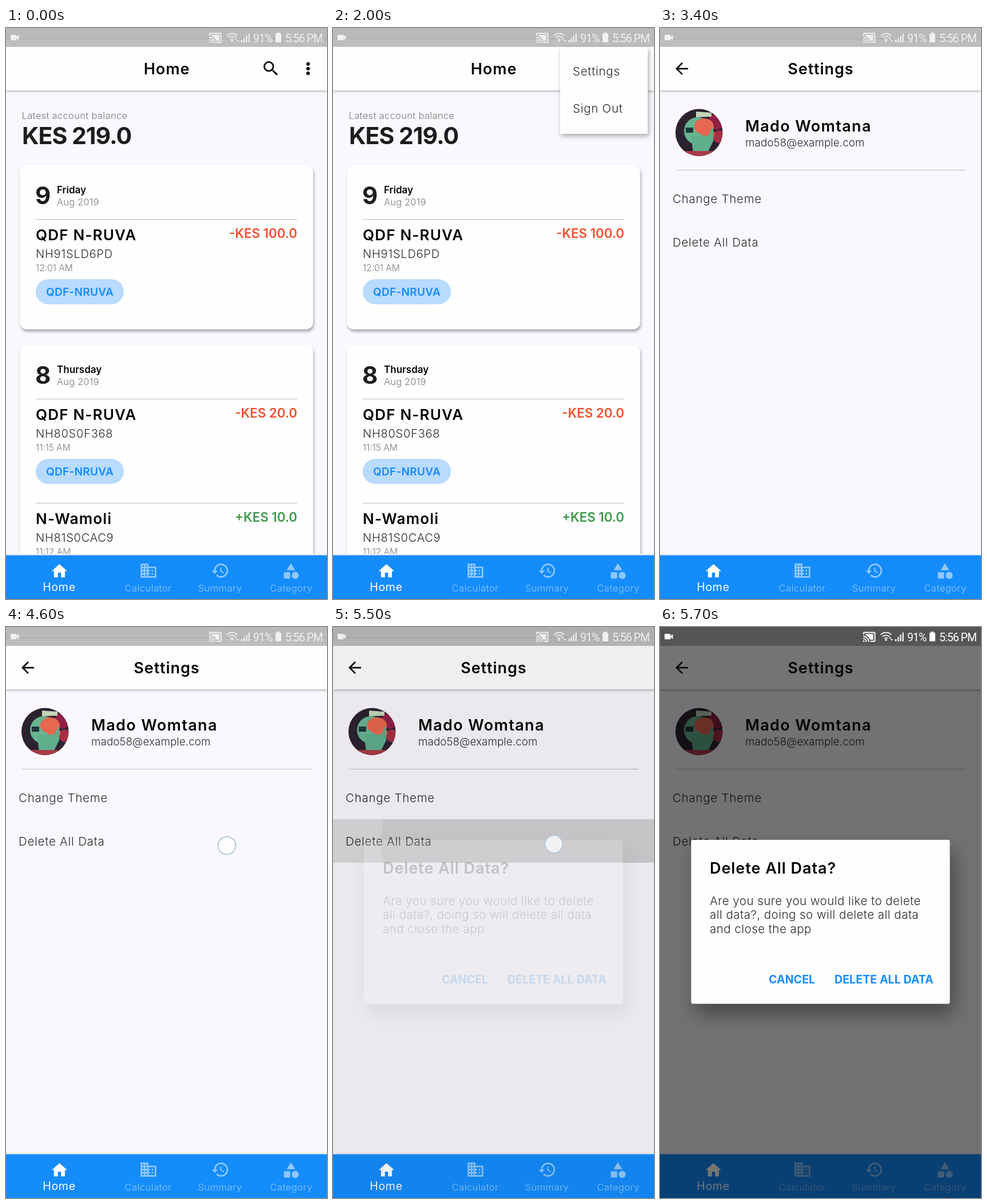
Recreate the animation shown at these times as an HTML page. Size 561 by 998 pixels, loop 8 s.

```html
<!DOCTYPE html>
<html lang="en">
<head>
<meta charset="utf-8">
<title>Money tracker</title>
<style>
  html, body { margin: 0; width: 100%; height: 100%; overflow: hidden; background: #faf8fc; }
  svg { display: block; width: 100vw; height: 100vh; }
  text { font-family: Inter, "Open Sans", sans-serif; font-weight: 350; fill: #2b2a2d; white-space: pre; }
  .title { font-size: 27px; font-weight: 600; letter-spacing: .035em; fill: #060607; }
  .caption { font-size: 16.5px; letter-spacing: .02em; fill: #79787b; }
  .balance { font-size: 41px; font-weight: 700; letter-spacing: -.024em; fill: #1d1c1f; }
  .day { font-size: 42px; font-weight: 700; fill: #1d1c1f; }
  .weekday { font-size: 17px; font-weight: 600; fill: #060607; }
  .date { font-size: 16.5px; letter-spacing: .01em; fill: #79787b; }
  .time { font-size: 15.6px; fill: #79787b; }
  .payee { font-size: 26px; font-weight: 600; letter-spacing: .045em; fill: #060607; }
  .code { font-size: 20px; letter-spacing: .038em; }
  .amount { font-size: 22.3px; font-weight: 600; text-anchor: end; }
  .chip { font-size: 19px; font-weight: 600; letter-spacing: .015em; fill: #148cfc; text-anchor: middle; }
  .tab { font-size: 16.5px; letter-spacing: .028em; fill: #fff; text-anchor: middle; }
  .tab.on { font-size: 19.5px; font-weight: 400; letter-spacing: .035em; }
  .person { font-size: 27px; font-weight: 600; letter-spacing: .05em; fill: #060607; }
  .mail { font-size: 18.8px; letter-spacing: .005em; }
  .item { font-size: 20.5px; letter-spacing: .036em; }
  .body { font-size: 20.5px; letter-spacing: .023em; }
  .button { font-size: 19.5px; font-weight: 700; letter-spacing: .005em; fill: #148cfc; }
  .status { font: 19.5px Roboto, sans-serif; letter-spacing: -.05em; fill: #fff; }
  .mid { text-anchor: middle; }
</style>
</head>
<body>
<svg id="stage" viewBox="0 0 561 998" preserveAspectRatio="none"></svg>
<script>
const LOOP = 8000, STEP = 100;
const stage = document.getElementById('stage');

const text = (x, y, cls, str, extra = '') => `<text x="${x}" y="${y}" class="${cls}" ${extra}>${str}</text>`;
const rect = (x, y, w, h, fill, extra = '') => `<rect x="${x}" y="${y}" width="${w}" height="${h}" fill="${fill}" ${extra}/>`;
const icon = (x, y, scale, d, fill = '#0b0b0c') =>
  `<path transform="translate(${x} ${y}) scale(${scale})" d="${d}" fill="${fill}" fill-rule="evenodd"/>`;
const shadow = (id, dx, dy, blur, alpha) =>
  `<filter id="${id}" x="-20%" y="-30%" width="140%" height="170%"><feDropShadow dx="${dx}" dy="${dy}" stdDeviation="${blur}" flood-opacity="${alpha}"/></filter>`;
const divider = (x1, x2, y) => rect(x1, y, x2 - x1, 1, '#bcbbbd');

const ICONS = {
  search: 'M15.5 14h-.79l-.28-.27A6.47 6.47 0 0 0 16 9.5 6.5 6.5 0 1 0 9.5 16c1.61 0 3.09-.59 4.23-1.57l.27.28v.79l5 4.99L20.49 19zm-6 0a4.5 4.5 0 1 1 0-9 4.5 4.5 0 0 1 0 9z',
  back: 'M20 11H7.83l5.59-5.59L12 4l-8 8 8 8 1.41-1.41L7.83 13H20z',
  home: 'M10 20v-6h4v6h5v-8h3L12 3 2 12h3v8z',
  building: 'M12 7V3H2v18h20V7zM6 19H4v-2h2zm0-4H4v-2h2zm0-4H4V9h2zm0-4H4V5h2zm4 12H8v-2h2zm0-4H8v-2h2zm0-4H8V9h2zm0-4H8V5h2zm10 12h-8v-2h2v-2h-2v-2h2v-2h-2V9h8zm-2-8h-2v2h2zm0 4h-2v2h2z',
  history: 'M13 3a9 9 0 0 0-9 9H1l4 4 4-4H6a7 7 0 1 1 2.06 4.94l-1.42 1.42A9 9 0 1 0 13 3zm-1 5v5l4.28 2.54.72-1.21-3.5-2.08V8z',
  shapes: 'M12 2l-5.5 9h11zM3 13.5h8v8H3zM22 17.5a4.5 4.5 0 1 1-9 0 4.5 4.5 0 0 1 9 0z',
  cast: 'M1 18v3h3c0-1.66-1.34-3-3-3zm0-4v2a5 5 0 0 1 5 5h2a7 7 0 0 0-7-7zm0-4v2a9 9 0 0 1 9 9h2A11 11 0 0 0 1 10zM21 3H3a2 2 0 0 0-2 2v3h2V5h18v14h-7v2h7a2 2 0 0 0 2-2V5a2 2 0 0 0-2-2zM5 7v1.6c4 1.3 7 4.3 8.4 8.4H19V7z'
};

const appBar = title =>
  rect(0, 20, 561, 89, '#fefdff', 'filter="url(#barShadow)"') + text(281, 80.5, 'title mid', title);

const card = (y, h, day, weekday) =>
  rect(24.5, y, 512, h, '#fffeff', 'rx="12" filter="url(#cardShadow)"') +
  text(51, y + 67.5, 'day', day) + text(89, y + 49, 'weekday', weekday) +
  text(89, y + 69.5, 'date', 'Aug 2019');

const entry = (y, payee, code, time, amount, chip) =>
  divider(52, 509, y) + text(52, y + 37, 'payee', payee) + text(52, y + 67.5, 'code', code) +
  text(52, y + 91, 'time', time) +
  text(509, y + 33, 'amount', amount, `style="fill:${amount[0] === '+' ? '#3d9a4a' : '#f4502f'}"`) +
  (chip ? rect(52, y + 105, 154, 44, '#b8dbff', 'rx="22"') + text(129, y + 134, 'chip', chip) : '');

const tab = (x, label, d, ix, iy, on) =>
  `<g opacity="${on ? 1 : .52}">${icon(ix, iy, 1.37, d, '#fff')}${text(x, on ? 983.5 : 984.5, on ? 'tab on' : 'tab', label)}</g>`;

const homePage = rect(0, 0, 561, 998, '#faf8fc') +
  text(27.5, 158.5, 'caption', 'Latest account balance') + text(28, 203, 'balance', 'KES 219.0') +
  card(240, 286.5, '9', 'Friday') +
  entry(334, 'QDF N-RUVA', 'NH91SLD6PD', '12:01 AM', '-KES 100.0', 'QDF-NRUVA') +
  card(554, 420, '8', 'Thursday') +
  entry(648, 'QDF N-RUVA', 'NH80S0F368', '11:15 AM', '-KES 20.0', 'QDF-NRUVA') +
  entry(830, 'N-Wamoli', 'NH81S0CAC9', '11:12 AM', '+KES 10.0') +
  appBar('Home') + icon(445.7, 53.7, 1.43, ICONS.search) +
  [62.8, 71, 79.2].map(y => `<circle cx="528" cy="${y}" r="3.1" fill="#0b0b0c"/>`).join('');

const avatar = `<g clip-path="url(#avatarClip)">
  ${rect(27, 141, 83, 84, '#2b2230')}
  <circle cx="98" cy="164" r="14" fill="#8f1f45"/><circle cx="103" cy="190" r="11" fill="#a52f44"/>
  <circle cx="66" cy="180" r="24" fill="#67b592"/>
  <ellipse cx="77" cy="172" rx="17" ry="14" fill="#e8674f"/>
  <circle cx="84" cy="185" r="11" fill="#e8674f"/>
  <path d="M63 146l27 2v7l-27 1z" fill="#c3d6b8"/>
  <path d="M54 188h30l9-16v26l-10 20H58z" fill="#5fae8c"/>
  ${rect(45, 174, 13, 9, '#22343a')}${rect(27, 215, 83, 10, '#a93a45')}
</g>`;

const settingsPage = rect(0, 0, 561, 998, '#faf8fc') + appBar('Settings') +
  icon(21.5, 54.5, 1.38, ICONS.back) + avatar +
  text(149, 181, 'person', 'Mado Womtana') + text(149, 207, 'mail', 'mado58@example.com') +
  divider(27, 534, 248) +
  `<g id="pressed" clip-path="url(#rowClip)">${rect(0, 336, 561, 76, '#000', 'opacity=".12"')}
    <circle id="ripple" cx="386" cy="379" opacity=".05"/></g>` +
  text(22, 306, 'item', 'Change Theme') + text(22, 382, 'item', 'Delete All Data');

const navBar = rect(0, 919, 561, 2, '#f0eef2') + rect(0, 921.5, 561, 77, '#148cfc') +
  tab(93, 'Home', ICONS.home, 77, 932.8, true) +
  tab(248.5, 'Calculator', ICONS.building, 232.5, 932) +
  tab(374, 'Summary', ICONS.history, 358, 932) +
  tab(498.5, 'Category', ICONS.shapes, 481.5, 932.8);

const menu = `<g id="menu"><rect id="menuBox" y="33" rx="3" fill="#fffeff" filter="url(#menuShadow)"/>
  ${rect(397, 43, 153, 65.5, '#f4f2f5', 'id="hover"')}
  ${text(419, 83, 'item', 'Settings', 'id="item0"')}${text(419, 148, 'item', 'Sign Out', 'id="item1"')}</g>`;

const dialog = `<g id="dialog">${rect(54.5, 372, 452, 286.5, '#fffeff', 'rx="3" filter="url(#dialogShadow)"')}
  ${text(87, 431, 'title', 'Delete All Data?')}
  ${['Are you sure you would like to delete', 'all data?, doing so will delete all data', 'and close the app']
    .map((line, i) => text(87, 485.5 + i * 24.5, 'body', line)).join('')}
  ${text(190, 623, 'button', 'CANCEL')}${text(305, 623, 'button', 'DELETE ALL DATA')}</g>`;

const wifiArc = r => `<path d="M${395 - r * .72} ${23 - r * .72}a${r} ${r} 0 0 1 ${r * 1.44} 0" fill="none" stroke="#fff" stroke-width="1.8"/>`;
const statusIcons = `<g id="status">
  ${rect(8, 12, 10.5, 9.5, '#fff', 'rx="1"')}<path d="M18 16l4.5-3.5v8.5L18 17.5z" fill="#fff"/>
  ${icon(354, 5.5, .98, ICONS.cast, '#fff')}
  ${[4, 8.5, 13].map(wifiArc).join('')}<circle cx="395" cy="22.5" r="1.8" fill="#fff"/>
  <path d="M400 20l2-3 2 3zm3 1h4l-2 3z" fill="#fff"/>
  ${[0, 1, 2, 3].map(i => rect(411 + i * 4.2, 21 - i * 3.8, 2.2, 4 + i * 3.8, '#fff')).join('')}
  ${text(432, 24.5, 'status', '91%')}
  <path d="M473.5 8h5v2h2.5v15h-10V10h2.5z" fill="#fff"/>
  ${text(488, 24.5, 'status', '5:56 PM')}</g>`;

stage.innerHTML = `<defs>
  ${shadow('barShadow', 0, 1.5, 2, .32)}${shadow('cardShadow', 1.5, 4, 2.8, .34)}
  ${shadow('menuShadow', 2, 4, 4, .32)}${shadow('dialogShadow', 7, 18, 17, .38)}
  <clipPath id="pageClip">${rect(0, 0, 561, 921, '#000')}</clipPath>
  <clipPath id="rowClip">${rect(0, 336, 561, 76, '#000')}</clipPath>
  <clipPath id="avatarClip"><circle cx="68.2" cy="182.8" r="41.2"/></clipPath>
  </defs>
  <g clip-path="url(#pageClip)"><g>${homePage}</g><g id="settings">${settingsPage}</g>${menu}</g>
  ${navBar}${rect(0, 0, 561, 33, '#000', 'opacity=".255"')}
  ${rect(0, 0, 561, 998, '#000', 'id="scrim"')}${dialog}${statusIcons}
  <circle id="touch" r="15.5" fill="#fdfdff" fill-opacity=".75" stroke="#b4c8dc" stroke-width="2"/>`;

const part = {};
stage.querySelectorAll('[id]').forEach(el => part[el.id] = el);
const set = (id, attrs) => { for (const k in attrs) part[id].setAttribute(k, attrs[k]); };

const clamp = v => Math.min(1, Math.max(0, v));
const span = (t, from, to) => clamp((t - from) / (to - from));

// CSS-style cubic easing, solved by bisection
const bezier = (x1, y1, x2, y2) => x => {
  const at = (a, b, s) => 3 * a * s * (1 - s) ** 2 + 3 * b * s * s * (1 - s) + s ** 3;
  let lo = 0, hi = 1;
  for (let i = 0; i < 24; i++) {
    const mid = (lo + hi) / 2;
    if (at(x1, x2, mid) < x) lo = mid; else hi = mid;
  }
  return at(y1, y2, hi);
};
const fastOutSlowIn = bezier(.4, 0, .2, 1), easeIn = bezier(.42, 0, 1, 1);
const easeOut = bezier(0, 0, .58, 1), ease = bezier(.25, .1, .25, 1);

const taps = [
  { from: 1500, to: 1700, x: 538, y: 67 },
  { from: 3000, to: 3150, x: 489, y: 80 },
  { from: 4600, to: 5100, x: 386, y: 382 },
  { from: 5300, to: 5550, x: 386, y: 379.5 }
];

function drawMenu(t) {
  const p = t < 3000 ? span(t, 1650, 1950) : clamp((1 - span(t, 3050, 3350)) * 1.5);
  const unit = 1 / 3.5;
  const w = 153 * clamp(p / unit), h = 152 * clamp(p / (2 * unit));
  set('menu', { opacity: clamp(p * 3) });
  set('menuBox', { x: 550 - w, width: w, height: h });
  [0, 1].forEach(i => set('item' + i, { opacity: span(p, unit * (i + 1), unit * (i + 2.5)) }));
  set('hover', { opacity: t >= 3000 ? clamp(p * 2 - 1) : 0 });
}

function draw(t) {
  drawMenu(t);

  const page = span(t, 3070, 3370);
  set('settings', { opacity: easeIn(page), transform: `translate(0 ${222 * (1 - fastOutSlowIn(page))})` });

  set('pressed', { opacity: span(t, 5250, 5450) * (1 - span(t, 5520, 5680)) });
  set('ripple', { r: 301 * span(t, 5270, 5500) });

  const pop = span(t, 5484, 5634);
  set('scrim', { opacity: .54 * ease(pop) });
  set('dialog', { opacity: easeOut(pop) });
  set('status', { opacity: .8 + .2 * pop });

  const tap = taps.find(k => t >= k.from && t < k.to);
  set('touch', tap ? { cx: tap.x, cy: tap.y, opacity: 1 } : { opacity: 0 });
}

const start = performance.now();
function tick() {
  const t = (performance.now() - start) % LOOP;
  draw(Math.floor(t / STEP) * STEP);
  requestAnimationFrame(tick);
}
tick();
</script>
</body>
</html>
```
